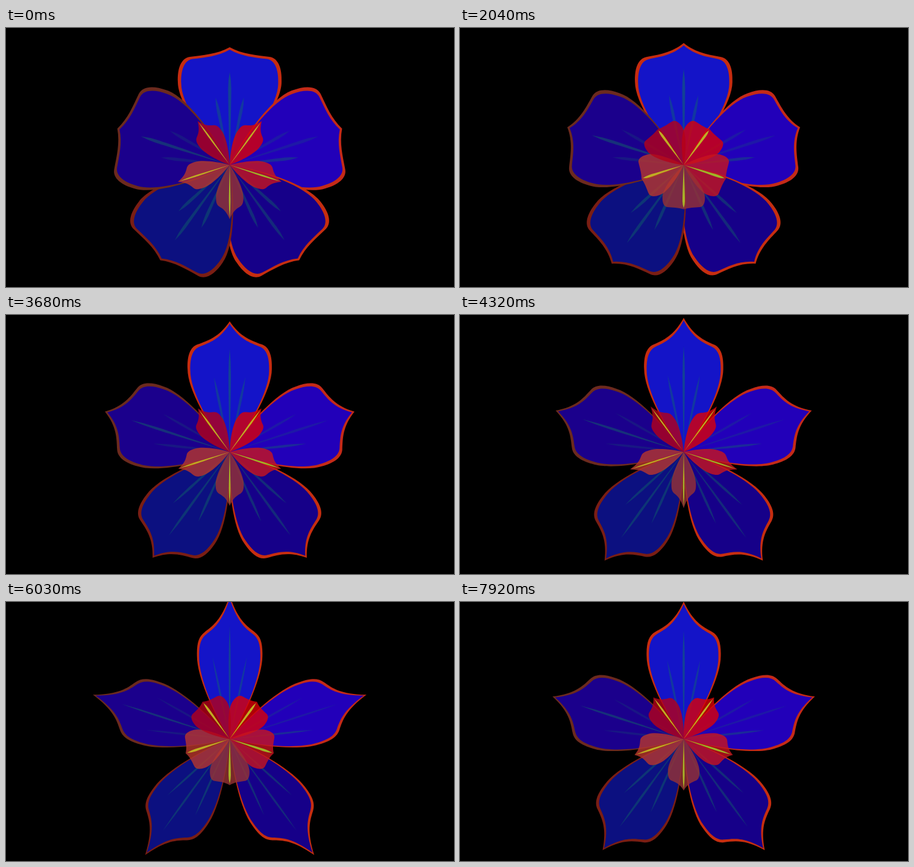
Recreate the animation shown at these times as an HTML page with a canvas. Size 743x431 px, loop 7.99 s.

```html
<!DOCTYPE html>
<html lang="en">
<head>
<meta charset="utf-8">
<title>Breathing flower</title>
<style>
  html, body { margin: 0; width: 100%; height: 100%; overflow: hidden; background: #000; }
  canvas { display: block; }
</style>
</head>
<body>
<canvas id="stage" width="743" height="431"></canvas>
<script>
const ctx = document.getElementById('stage').getContext('2d');
const LOOP = 7990;
const CENTER = [371, 228];
const INNER_SIZE = 0.388;
const VEIN_TURN = 11.8;

// Painted clockwise from the top; veins holds the opacity of left, middle and right vein.
const outerPetals = [
  { fill: '#1414c8', edge: '#c62c10', veins: [0.4, 0.5, 0.4] },
  { fill: '#2200b9', edge: '#c42a18', veins: [0.22, 0.22, 0.38] },
  { fill: '#160089', edge: '#c62e10', veins: [0.4, 0.38, 0.4] },
  { fill: '#0c1080', edge: '#7a1e14', veins: [0.4, 0.4, 0.4] },
  { fill: '#1b008c', edge: '#6c2a1e', veins: [0.22, 0.45, 0.2] }
];
const innerPetals = [
  { fill: 'rgb(218 0 8 / .8)', line: '#c0ae24' },
  { fill: 'rgb(200 20 30 / .8)', line: '#a0b426' },
  { fill: 'rgb(152 50 52 / .8)', line: '#a8b228' },
  { fill: 'rgb(184 54 44 / .8)', line: '#c0ac22' },
  { fill: 'rgb(180 0 25 / .8)', line: '#c0ac22' }
];

const radians = deg => deg * Math.PI / 180;

// Triangle wave: low at time start, high half a period later.
function swing(t, start, half, low, high) {
  const phase = Math.abs((t - start) / half) % 2;
  return low + (high - low) * (phase < 1 ? phase : 2 - phase);
}

const tipRadius = stretch => 196 + 40 * stretch;
const widthScale = stretch => 1 - 0.347 * stretch;

// One petal pointing up; stretch lengthens the tip and narrows the sides.
function petalPath(stretch, kx = 1, ky = 1) {
  const sx = widthScale(stretch) * kx;
  const tip = tipRadius(stretch);
  const kneeY = 180 - 2 * stretch;
  const slope = (3 + 7 * stretch) / 22;
  const half = [
    [0, 0], [45, 45], [86, 105], [86, 138],
    [87, 160], [81, kneeY - 15 * slope], [66, kneeY],
    [44, kneeY + 22 * slope], [22, 184 + 13 * stretch], [0, tip]
  ];
  const left = half.map(([x, y]) => [-x * sx, -y * ky]);
  const right = half.map(([x, y]) => [x * sx, -y * ky]).reverse();
  const path = new Path2D();
  path.moveTo(0, 0);
  for (const side of [left, right]) {
    for (let i = 1; i < side.length; i += 3) {
      path.bezierCurveTo(...side[i], ...side[i + 1], ...side[i + 2]);
    }
  }
  path.closePath();
  return path;
}

// Thin spear whose widest place stays put while its point moves.
function spear(length, widest, w) {
  ctx.beginPath();
  ctx.moveTo(0, 0);
  ctx.bezierCurveTo(-w * 0.5, -widest * 0.4, -w, -widest * 0.8, -w, -widest);
  ctx.quadraticCurveTo(-w, -(widest + length) / 2, 0, -length);
  ctx.quadraticCurveTo(w, -(widest + length) / 2, w, -widest);
  ctx.bezierCurveTo(w, -widest * 0.8, w * 0.5, -widest * 0.4, 0, 0);
  ctx.fill();
}

function turned(deg, paint) {
  ctx.save();
  ctx.rotate(radians(deg));
  paint();
  ctx.restore();
}

function drawOuter(stretch) {
  const outline = petalPath(stretch);
  const face = petalPath(stretch, 0.935, 0.98);
  const tip = tipRadius(stretch);
  const w = 2.6 * widthScale(stretch);
  outerPetals.forEach((petal, i) => turned(i * 72, () => {
    ctx.fillStyle = petal.edge;
    ctx.fill(outline);
    ctx.fillStyle = petal.fill;
    ctx.fill(face);
    petal.veins.forEach((alpha, j) => turned((j - 1) * VEIN_TURN, () => {
      ctx.fillStyle = `rgb(16 110 100 / ${alpha})`;
      if (j === 1) spear(tip * 0.79, 128, w);
      else spear(tip * 0.585, 92, w);
    }));
  }));
}

function drawInner(stretch) {
  const face = petalPath(stretch);
  ctx.scale(INNER_SIZE, INNER_SIZE);
  innerPetals.forEach((petal, i) => turned(36 + i * 72, () => {
    ctx.fillStyle = petal.fill;
    ctx.fill(face);
    ctx.fillStyle = petal.line;
    spear(tipRadius(stretch) * 0.97, 155, 5 * widthScale(stretch));
  }));
}

function draw(t) {
  ctx.setTransform(1, 0, 0, 1, 0, 0);
  ctx.fillStyle = '#000';
  ctx.fillRect(0, 0, 743, 431);
  ctx.translate(...CENTER);
  drawOuter(swing(t, 629, 5800, -0.14, 1.152));
  drawInner(swing(t, 1880, 2320, -0.26, 1.2));
}

const begin = performance.now();
function tick() {
  draw((performance.now() - begin) % LOOP);
  requestAnimationFrame(tick);
}
tick();
</script>
</body>
</html>
```
